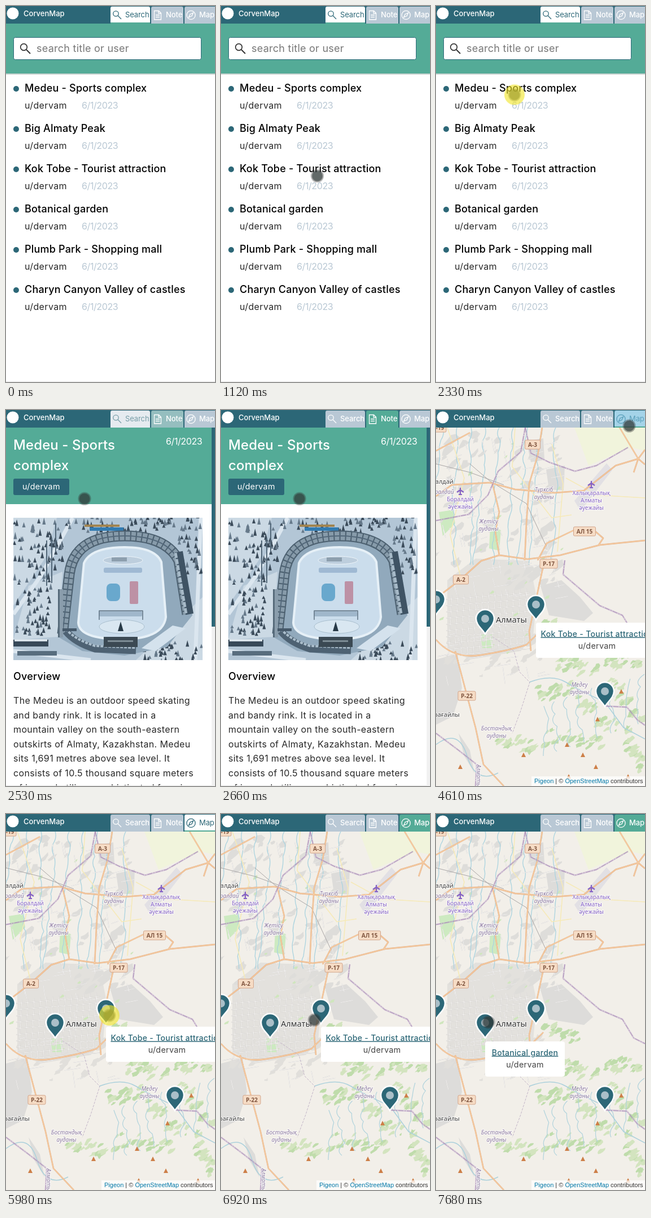
An HTML page that plays this animation: 370 by 663 pixels, repeating every 8 s.

```html
<!DOCTYPE html>
<html lang="en">
<head>
<meta charset="utf-8">
<title>Place notes</title>
<style>
html, body { margin: 0; width: 100%; height: 100%; overflow: hidden; background: #fff; }
svg { display: block; width: 100vw; height: 100vh; font-family: Inter, sans-serif; }
g { --loop: 8s infinite; }

.brand { font: 500 13px Inter, sans-serif; fill: #fff; }
.tab { font-size: 13px; font-weight: 500; }
.tab text { fill: currentColor; letter-spacing: -.1px; }
.tab path, .tab circle { fill: none; stroke: currentColor; stroke-width: 1.3; }
.tab .bar { fill: #54ab97; }
.heading { font-size: 18px; font-weight: 500; letter-spacing: .2px; }
.body { font-size: 16px; letter-spacing: .36px; fill: #282828; }
.date { font-size: 16px; letter-spacing: -.4px; fill: #b9c8d4; }
.hint { font-size: 18px; letter-spacing: .25px; fill: #777; }
.title { font-size: 24px; font-weight: 500; letter-spacing: .1px; fill: #fff; }
.link { font-size: 14px; font-weight: 500; letter-spacing: .3px; fill: #2c6777; text-decoration: underline; }
.by { font-size: 14.3px; letter-spacing: .3px; fill: #444; }
.mid { text-anchor: middle; }
.map text { font-family: "Noto Sans", sans-serif; paint-order: stroke; stroke: #fffb; stroke-width: 2px; }
.map .area { font-size: 10px; font-style: italic; fill: #8b78a0; }
.map .air { font-size: 10px; fill: #8461c4; }
.map .town { font-size: 11px; fill: #444; }
.map .city { font-size: 14.5px; fill: #333; }
.map .road { font-size: 10px; font-weight: 600; fill: #805640; stroke: none; }
.credit { font: 11px "Liberation Sans", Arial, sans-serif; fill: #333; }
.credit tspan { fill: #0078a8; }

.page-search { animation: page-search var(--loop) step-end; }
.page-note { animation: page-note var(--loop) step-end; }
.page-map { animation: page-map var(--loop) step-end; }
.popup-hill { animation: popup-hill var(--loop) step-end; }
.popup-garden { animation: popup-garden var(--loop) step-end; }
.tab-search { animation: tab-search var(--loop) linear; }
.tab-note { animation: tab-note var(--loop) linear; }
.tab-map { animation: tab-map var(--loop) linear; }
.tab-search .bar { animation: page-search 8s infinite step-end; }
.tab-map .bar { animation: bar-map 8s infinite step-end; }
.cursor { animation: move var(--loop) linear, appear var(--loop) step-end; }
.click { animation: click 8s infinite step-end; }

@keyframes page-search { 0% { visibility: visible } 30.75%, 100% { visibility: hidden } }
@keyframes page-note { 0%, 57.625%, 100% { visibility: hidden } 30.75% { visibility: visible } }
@keyframes page-map { 0% { visibility: hidden } 57.625%, 100% { visibility: visible } }
@keyframes popup-hill { 0%, 90.9%, 100% { visibility: hidden } 57.625% { visibility: visible } }
@keyframes popup-garden { 0% { visibility: hidden } 90.9%, 100% { visibility: visible } }
@keyframes bar-map { 0%, 77.5%, 100% { visibility: hidden } 57.625% { visibility: visible } }
@keyframes tab-search {
  0%, 30.75% { fill: #fff; color: #2c6777; font-weight: 400 }
  33.25%, 100% { fill: #b9c8d5; color: #fff; font-weight: 500 }
}
@keyframes tab-note {
  0%, 30.75%, 57.625%, 100% { fill: #b9c8d5; color: #fff }
  33.25%, 57.62% { fill: #54ab97; color: #fff }
}
@keyframes tab-map {
  0%, 57.62% { fill: #b9c8d5; color: #fff; font-weight: 500 }
  57.625% { fill: #a3d3e8; color: #5a9fba; font-weight: 400 }
  59.375%, 76.375% { fill: #fff; color: #2c6777; font-weight: 400 }
  78.875%, 100% { fill: #54ab97; color: #fff; font-weight: 500 }
}
@keyframes appear { 0% { opacity: 0 } 7.375%, 100% { opacity: 1 } }
@keyframes click {
  0%, 30.75%, 57.625%, 76.375%, 100% { opacity: 0 }
  29.125%, 56%, 74.75% { opacity: .62 }
}
@keyframes move {
  0%, 7.375% { transform: translate(308px, 645px); animation-timing-function: ease-in-out }
  17.375%, 18.25% { transform: translate(128px, 193px) }
  19.875%, 26.5% { transform: translate(130px, 171px) }
  28.25%, 45% { transform: translate(139px, 156.5px); animation-timing-function: cubic-bezier(.4, .1, .7, .8) }
  49.25% { transform: translate(288px, 86px); animation-timing-function: ease-out }
  54.375%, 62.875% { transform: translate(342px, 28px); animation-timing-function: ease-in-out }
  72.125%, 73.125% { transform: translate(187px, 364px) }
  74.75%, 83.875% { transform: translate(183px, 355px); animation-timing-function: ease-in-out }
  93.375%, 94.25% { transform: translate(73px, 406px) }
  96%, 100% { transform: translate(93px, 367px) }
}
</style>
</head>
<body>
<svg id="stage" viewBox="0 0 370 663"></svg>
<script>
const TEAL = '#2c6777', GREEN = '#54ab97', USER = 'u/dervam';
let seed = 11;
const random = () => (seed = seed * 16807 % 2147483647) / 2147483647;
const between = (a, b) => a + (b - a) * random();
const times = (n, make) => Array.from({ length: n }, (_, i) => make(i)).join('');
const rect = (x, y, w, h, fill, more = '') => `<rect x="${x}" y="${y}" width="${w}" height="${h}" fill="${fill}" ${more}/>`;
const text = (x, y, words, kind, more = '') => `<text x="${x}" y="${y}" class="${kind}" ${more}>${words}</text>`;
const area = (d, fill) => `<path d="${d}" fill="${fill}"/>`;
const line = (d, color, width, more = '') =>
  `<path d="${d}" fill="none" stroke="${color}" stroke-width="${width}" stroke-linejoin="round" ${more}/>`;
const group = (kind, inner) => `<g class="${kind}">${inner}</g>`;

function searchPage() {
  const places = ['Medeu - Sports complex', 'Big Almaty Peak', 'Kok Tobe - Tourist attraction',
    'Botanical garden', 'Plumb Park - Shopping mall', 'Charyn Canyon Valley of castles'];
  return rect(0, 31, 370, 632, '#fff') + rect(0, 119, 370, 2, '#c9d3d0') + rect(0, 31, 370, 88, GREEN)
    + rect(13.5, 55.5, 332, 39, '#fff', `rx="3" stroke="${TEAL}"`)
    + `<circle cx="31.5" cy="72.5" r="5.8" fill="none" stroke="#333" stroke-width="1.7"/>`
    + line('M36 77L43 84', '#333', 2) + text(54, 81, 'search title or user', 'hint')
    + places.map((place, i) => {
      const y = 71 * i;
      return `<circle cx="18" cy="${146 + y}" r="5" fill="${TEAL}"/>` + text(33, 151 + y, place, 'heading')
        + text(33, 181 + y, USER, 'body') + text(134, 181 + y, '6/1/2023', 'date');
    }).join('') + rect(0, 662, 370, 1, '#e6e6e6');
}

function photo() {
  const rink = 'M138 270Q150 242 210 242Q264 242 275 268L283 365Q278 404 205 404Q130 404 128 375Z';
  const stands = 'M100 395L112 290Q120 222 210 222Q284 222 306 266L321 360';
  const trees = (n, x0, x1, y0, y1) => times(n, () => {
    const x = between(x0, x1), y = between(y0, y1), h = between(5, 13);
    return area(`M${x - 3} ${y}L${x} ${y - h}L${x + 3} ${y}Z`, random() < .6 ? '#3b4b5a' : '#66798a');
  });
  return `<svg x="13" y="190" width="335" height="251" viewBox="13 190 335 251">`
    + rect(13, 190, 335, 251, '#b3c6d6')
    + area('M13 190H90L70 260L13 345ZM40 310L100 285L92 400L13 405ZM230 441L348 330V441Z', '#cbd9e4')
    + line('M13 360L62 292L118 190M13 425L150 441M345 190L335 441', '#dbe6ef', 7)
    + trees(65, 15, 100, 200, 285) + trees(60, 15, 80, 290, 400) + trees(65, 100, 346, 190, 222)
    + trees(30, 300, 346, 215, 300) + trees(45, 245, 346, 412, 446)
    + rect(139, 202, 62, 4, '#a18450') + rect(148, 207, 60, 6, '#327bb1')
    + area('M92 400L108 285Q118 214 210 214Q290 214 312 264L330 362L285 418L210 433L135 425Z', '#91a9bc')
    + line(stands, '#4c6070', 19) + line(stands, '#879baa', 15, 'stroke-dasharray="8 2"')
    + line(stands, '#53687a', 2) + line('M306 250L325 360', '#3f5364', 14)
    + line('M300 252L319 360', '#a7bac8', 5, 'stroke-dasharray="9 2"')
    + line('M106 390Q122 410 158 421L230 424', '#4e6273', 13)
    + line('M106 386Q122 405 158 416L230 419', '#aabdcb', 4, 'stroke-dasharray="5 2"')
    + area(rink, '#cbddec') + line(rink, '#e6f0f7', 4)
    + `<ellipse cx="207" cy="265" rx="35" ry="7" fill="#bdcedd" stroke="#eef5fa"/>` + rect(187, 260, 27, 7, '#8d9fae')
    + rect(173, 278, 68, 9, '#9fb9d3', 'rx="3"') + rect(178, 306, 24, 31, '#69a8cd', 'rx="8"')
    + rect(219, 302, 15, 40, '#bd91a5', 'rx="2"') + rect(165, 355, 76, 9, '#a0b7cb', 'rx="2"')
    + line('M165 370V354H242V370', '#5d7080', 1.5)
    + `<ellipse cx="205" cy="382" rx="40" ry="12" fill="#d9e7f1" stroke="#a9bfce"/>`
    + area('M198 390L203 373L208 390Z', '#283a47') + rect(173, 400, 60, 18, '#3b4953') + rect(180, 406, 45, 3, '#7d8c95')
    + area('M240 420L295 380L318 385L265 425Z', '#d4e2ed')
    + rect(92, 316, 9, 85, '#8a9dac') + rect(92, 316, 3, 85, '#576b7b')
    + line('M72 230V310M81 226V305M88 200V250', '#526778', 2)
    + rect(13, 405, 62, 12, '#374959') + rect(15, 404, 58, 4, '#dae4ec')
    + rect(20, 425, 70, 8, '#586d7e') + rect(100, 385, 25, 5, '#46596a') + '</svg>';
}

function notePage() {
  const story = ['The Medeu is an outdoor speed skating', 'and bandy rink. It is located in a',
    'mountain valley on the south-eastern', 'outskirts of Almaty, Kazakhstan. Medeu',
    'sits 1,691 metres above sea level. It', 'consists of 10.5 thousand square meters',
    'of ice and utilizes sophisticated freezing'];
  return rect(0, 31, 370, 632, '#fff') + rect(0, 31, 364, 135, GREEN)
    + rect(364, 31, 6, 632, '#f1f1f1') + rect(364, 31, 6, 351, TEAL)
    + text(13, 70, 'Medeu - Sports', 'title') + text(13, 106, 'complex', 'title')
    + text(283, 61, '6/1/2023', 'date', 'style="fill:#fff"')
    + rect(13, 121, 99, 29, TEAL, 'rx="3"') + text(29, 140, USER, 'by', 'style="fill:#fff"')
    + photo() + text(13, 476, 'Overview', 'heading')
    + story.map((words, i) => text(13, 518 + 25.6 * i, words, 'body')).join('') + rect(0, 662, 364, 1, '#e6e6e6');
}

// Jagged patch, tilted up to the right
function patch(x, y, size, fill) {
  const points = Array.from({ length: 9 }, (_, i) => {
    const a = i * Math.PI / 4.5, k = size * between(.4, 1.2);
    const along = 1.5 * k * Math.cos(a), across = .7 * k * Math.sin(a);
    return `${(x + .8 * along + .6 * across).toFixed(1)} ${(y - .6 * along + .8 * across).toFixed(1)}`;
  });
  return area(`M${points.join('L')}Z`, fill);
}

const ridge = (x0, y0, x1, y1) => times(20, i => {
  const k = i / 19;
  return patch(x0 + (x1 - x0) * k + between(-9, 9), y0 + (y1 - y0) * k + between(-12, 12), between(3, 8),
    random() < .5 ? '#bfdcab' : '#d3e4bf');
});

const pin = (x, y) => `<path d="M${x} ${y}C${x - 6} ${y - 10} ${x - 16} ${y - 16} ${x - 16} ${y - 27}a16 16 0 0 1 32 0C${x + 16} ${y - 16} ${x + 6} ${y - 10} ${x} ${y}Z" fill="${TEAL}" stroke="#fff" stroke-width="2.5"/>
  <circle cx="${x}" cy="${y - 27}" r="7" fill="#aabfc8"/>`;

const shield = (x, y, w, name) => rect(x - w / 2, y - 8, w, 16, '#f6dcc5', 'rx="2" stroke="#d2a58b"') + text(x, y + 3.7, name, 'road mid');
const plane = (x, y) => line(`M${x} ${y - 6}V${y + 6}M${x - 6} ${y + 2}L${x} ${y - 2}L${x + 6} ${y + 2}M${x - 3} ${y + 6}H${x + 3}`, '#8461c4', 2.2);
const lines = (x, y, words, kind) => words.map((word, i) => text(x, y + 13 * i, word, kind + ' mid')).join('');

function land() {
  const city = 'M20 300L70 262L165 266L178 330L172 400L150 425L60 440L20 420Z';
  const suburbs = 'M185 310L222 300L255 330L278 358L262 372L200 362ZM0 440L38 430L46 490L30 540L0 555ZM40 570L60 600L68 640L50 610ZM160 55L190 50L192 88L168 92ZM195 105L228 98L226 142L200 140Z';
  const parks = 'M5 180L30 176L34 200L12 222ZM96 205L115 212L112 248L94 244ZM79 396H100V420H82Z';
  const ridges = [[182, 500, 240, 490], [212, 445, 268, 455], [285, 450, 365, 440], [305, 480, 365, 540],
    [250, 510, 315, 560], [195, 570, 290, 590], [115, 585, 190, 595], [198, 372, 250, 398], [335, 570, 370, 630]];
  return rect(0, 31, 370, 632, '#f2efe9') + area('M245 31H370V72L345 66L270 98Z', '#f1f4dc')
    + area(city, '#e3e1dd') + area(suburbs, '#dddcda') + area(parks, '#cdeac1')
    + area('M245 160L302 94L312 106L256 178Z', '#e2e0e4')
    + times(80, () => patch(between(0, 220), between(40, 310), between(3, 12), '#deddda'))
    + times(35, () => patch(between(0, 190), between(390, 470), between(3, 9), '#e1dfdb'))
    + times(22, () => patch(between(0, 230), between(60, 440), between(2, 5), '#cfe6bd'))
    + ridges.map(ends => ridge(...ends)).join('');
}

function roads() {
  const grid = times(13, i => `M${28 + i * 11} ${326 - i}L${22 + i * 11} ${438 - i * 2}`)
    + times(10, i => `M18 ${334 + i * 11}L168 ${322 + i * 11}`);
  const lanes = times(120, () => {
    const x = between(0, 215), y = between(45, 470), flat = random() < .5, n = between(8, 30);
    return `M${x} ${y}l${flat ? n : 4} ${flat ? -4 : n}`;
  });
  const rivers = times(9, i => `M${12 + i * 25} 31` + times(11, () => `q${between(-7, 4)} 11 ${between(-5, 3)} 22`));
  const creeks = times(8, i => `M${190 + i * 24} ${610 - i * 8}` + times(4, () => `q${between(-14, 2)} -9 ${between(-9, 7)} -22`));
  const main = 'M0 332L42 300L80 266L112 256L162 263L220 256L290 238L370 230M0 152L28 132L95 128L140 140L210 146L262 142L318 98L358 86L370 96M188 31L180 80L165 130L160 200L157 265M180 265L196 235L244 212L282 214L296 226L288 238M191 270L178 330L165 390L168 425M34 425L55 504L70 560L84 625L120 663M0 405Q30 440 80 432T160 414L190 385M325 31L358 86L350 110M358 86L370 70M100 130L112 180L105 215L112 256M0 72L60 40';
  const border = 'M0 195L58 184L92 150L110 108L150 74L158 31M158 31L168 76L200 92L246 108L284 98L340 66M228 265L225 290L258 318L290 345L330 362L350 395L370 405M299 522L338 524L356 546L370 556M0 570L40 600L72 625L70 663';
  const limit = 'M100 400L138 425L148 462L166 480L150 530L135 570';
  return line(rivers, '#aad3df', 1.3) + line(lanes, '#cfccca', 1.3) + line(lanes, '#fff', .7)
    + line(grid, '#c9c6c4', 1.5) + line(grid, '#fbfaf8', .8) + line(creeks, '#b0d3dc', 1.2)
    + line('M165 480Q205 465 230 480T299 515L332 560L370 580M0 590Q40 560 55 610T110 640', '#acd1dc', 1.5)
    + line('M20 31L50 120L25 220L45 300M140 31L135 100L205 190L240 185M230 120L285 150L370 155M205 60L225 130L215 250', '#f6eab8', 1.6)
    + line('M60 95L95 125L160 165L195 240M0 95L60 110L120 132', '#a9a6a6', 1)
    + line(main, '#dfa274', 2.4) + line(main, '#f8cfa5', 1.5)
    + line(border, '#b49ac3', 3, 'opacity=".4"') + line(border, '#a78ab5', 1, 'stroke-dasharray="9 2 2 2"')
    + line(limit, '#c3b5c8', 1, 'stroke-dasharray="4 2"');
}

function labels() {
  const peaks = [[328, 496], [286, 545], [155, 608], [232, 590], [260, 608], [283, 629], [43, 629], [235, 646], [340, 646]];
  return peaks.map(([x, y]) => area(`M${x - 4} ${y + 4}L${x} ${y - 4}L${x + 4} ${y + 4}Z`, '#cd7f48')).join('')
    + shield(171, 61, 27, 'A-3') + shield(263, 214, 39, 'АЛ 15') + shield(199.5, 271, 31, 'P-17')
    + shield(44, 299, 27, 'A-2') + shield(54.5, 504, 31, 'P-22') + shield(4, 31, 28, 'P-19')
    + plane(275, 131) + plane(43, 143)
    + lines(275, 150, ['Халықаралық', 'Алматы', 'әуежайы'], 'air') + lines(43, 161, ['Боралдай', 'әуежайы'], 'air')
    + lines(191, 144, ['Түрксіб', 'ауданы'], 'area') + lines(93, 200, ['Жетісу', 'ауданы'], 'area')
    + lines(254, 488, ['Медеу', 'ауданы'], 'area') + lines(107, 565, ['Бостандық', 'ауданы'], 'area')
    + text(-8, 130, 'ралдай', 'town') + text(-8, 148, 'оралдай', 'area') + text(-4, 541, 'рағайлы', 'town')
    + text(106, 375, 'Алматы', 'city') + text(0, 0, 'Алматы', 'area', 'transform="translate(72 625) rotate(90)"');
}

const popup = (kind, x, y, width, name) => group(kind, rect(x, y, width, 62, '#fff', 'rx="4"')
  + text(x + width / 2, y + 24.5, name, 'link mid') + text(x + width / 2, y + 45.5, USER, 'by mid'));

function mapPage() {
  return group('map', land() + roads() + labels())
    + pin(0, 361) + pin(87, 395) + pin(177, 370) + pin(299, 523)
    + popup('popup-hill', 177, 375, 216, 'Kok Tobe - Tourist attraction')
    + popup('popup-garden', 87, 401, 141, 'Botanical garden')
    + rect(169, 646, 201, 17, '#fff', 'opacity=".75"')
    + text(174, 658, '<tspan>Pigeon</tspan> | © <tspan>OpenStreetMap</tspan> contributors', 'credit');
}

function tab(name, x, width, icon, label, labelX) {
  return group(`tab tab-${name}`, `<path d="M${x} 31V4q0 -3 3 -3h${width - 6}q3 0 3 3V31Z" style="fill:inherit;stroke:none"/>`
    + (name === 'note' ? '' : `<rect class="bar" x="${x}" y="29" width="${width}" height="2"/>`)
    + icon + text(labelX, 19.7, label, ''));
}

const header = rect(0, 0, 370, 31, TEAL) + '<circle cx="12" cy="13" r="10.5" fill="#fff"/>'
  + text(31, 18, 'CorvenMap', 'brand')
  + tab('search', 185, 70, '<circle cx="194.5" cy="13.5" r="4.7"/><path d="M198 17L204 23"/>', 'Search', 211)
  + tab('note', 257, 57, '<path d="M262.5 8.5h8l4 4V24h-12ZM270 8.5V13h4.5M265 16h7M265 19.5h7"/>', 'Note', 283)
  + tab('map', 316, 57, '<circle cx="327.5" cy="16" r="7.6"/><path d="M331.5 12L329 17.5L323.5 20L326 14.5Z"/>', 'Map', 342);

const cursor = group('cursor', '<circle r="11.5" fill="#333" opacity=".38"/><circle r="9.5" fill="#2e3a38" opacity=".6"/>'
  + '<circle class="click" r="18" fill="#f0e62a"/>');

document.getElementById('stage').innerHTML = group('page-search', searchPage()) + group('page-note', notePage())
  + group('page-map', mapPage()) + header + cursor;
</script>
</body>
</html>
```
